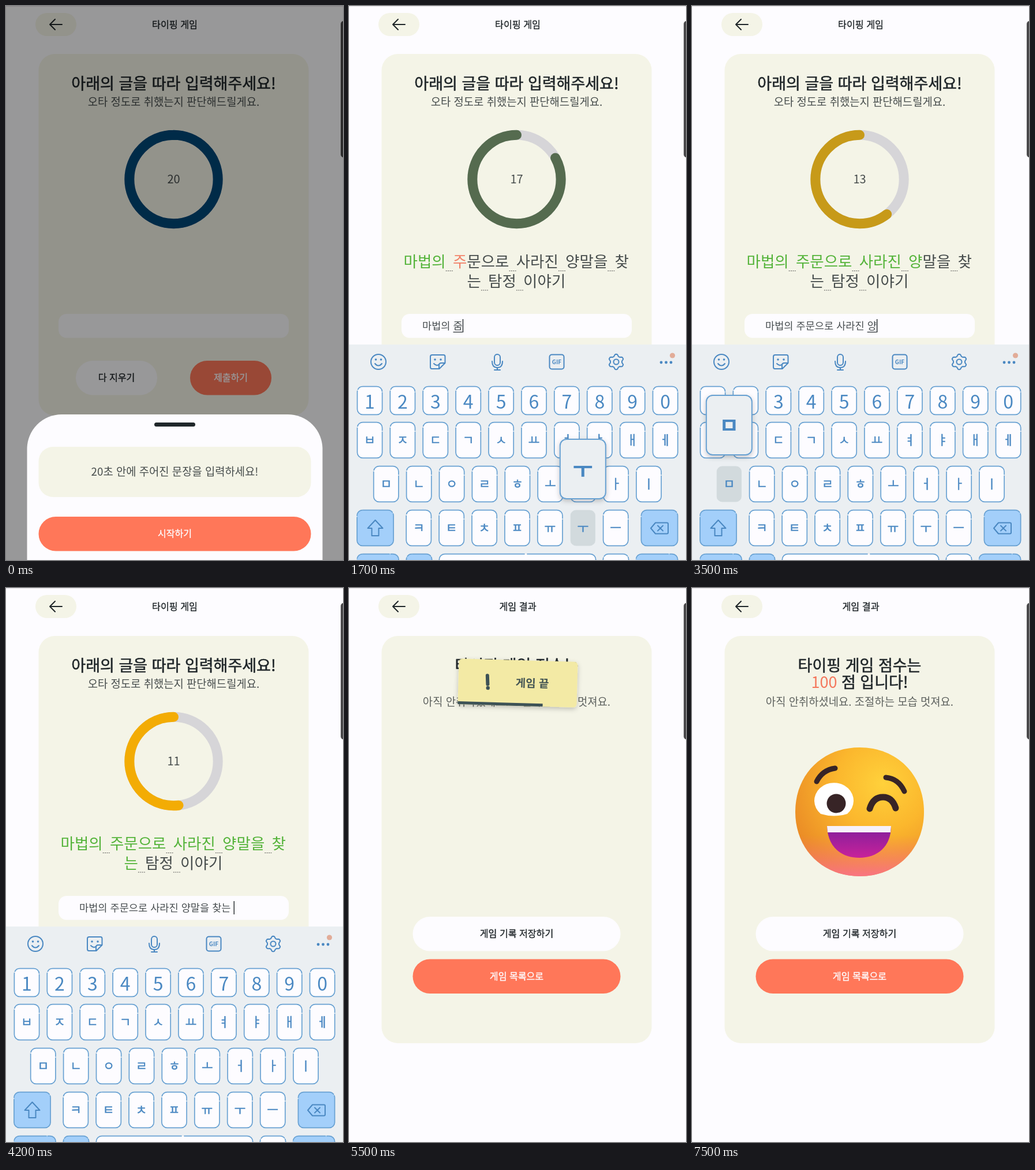
These frames come from a looping animation (584 px wide and 959 px high, 7.6 s). An HTML page:

```html
<!DOCTYPE html>
<html lang="ko">
<head>
<meta charset="utf-8">
<style>
  html, body { margin: 0; width: 100%; height: 100%; overflow: hidden; background: #fdfcff; }
  svg { display: block; width: 584px; height: 959px; }
  text { font-family: "Noto Sans CJK KR", "Noto Sans CJK", "Noto Sans CJK JP", sans-serif; white-space: pre; }
</style>
</head>
<body>
<svg id="stage" viewBox="0 0 584 959"></svg>
<script>
const LOOP = 7600, STEP = 100;
const INK = '#20272a', CREAM = '#f4f4e7', PAPER = '#fdfcff', CORAL = '#ff7759';
const BLUE = '#4a88c2', EDGE = '#68a1d2', SKY = '#a3cffa', BOARD = '#ebeff2', PRESSED = '#d2dadd';
const DARK = '#3d5256', BROWN = '#372426';
const MIDDLE = 'text-anchor="middle"';

// ---- markup helpers ----
// Only regular and bold faces exist: medium gets a hairline outline, light a softer fill.
const tone = (size, weight, fill) =>
  weight === 500 ? `stroke="${fill}" stroke-width="${size * 0.022}" stroke-linejoin="round"`
  : weight === 300 ? 'fill-opacity=".82"' : '';
const label = (s, x, y, size, weight = 400, fill = INK, extra = MIDDLE) =>
  `<text x="${x}" y="${y + size * 0.37}" font-size="${size}" font-weight="${weight === 700 ? 700 : 400}" fill="${fill}" ${tone(size, weight, fill)} ${extra}>${s}</text>`;
const box = (x, y, w, h, r, fill, extra = '') =>
  `<rect x="${x}" y="${y}" width="${w}" height="${h}" rx="${r}" fill="${fill}" ${extra}/>`;
const line = (d, width, stroke = BLUE, extra = '') =>
  `<path d="${d}" fill="none" stroke="${stroke}" stroke-width="${width}" stroke-linecap="round" stroke-linejoin="round" ${extra}/>`;
const button = (s, x, y, w, fill, color) =>
  box(x, y, w, 59.5, 29.75, fill) + label(s, x + w / 2, y + 29.5, 16.1, 500, color);

// ---- sentence to copy ----
const LINES = [['마법의 주문으로 사라진 양말을 찾', 94.5, 442, 458.5], ['는 탐정 이야기', 204.5, 476, 492]];
const GOAL = LINES.map(l => l[0]).join('');

function sentence() {
  return LINES.map(([chars, left, y, dotY]) => {
    let x = left;
    return [...chars].map(c => {
      const at = x;
      x += c === ' ' ? 12.2 : 24.4;
      return c === ' '
        ? `<path class="glyph" d="M${at} ${dotY}h12" stroke="#555" stroke-dasharray="2 1.4"/>`
        : label(c, at, y, 26.5, 300, INK, 'class="glyph"');
    }).join('');
  }).join('');
}

// ---- keyboard ----
const ROWS = [
  ['1234567890', 36, 658, 50],
  ['ㅂㅈㄷㄱㅅㅛㅕㅑㅐㅔ', 36, 720, 63],
  ['ㅁㄴㅇㄹㅎㅗㅓㅏㅣ', 64.3, 796, 63],
  ['ㅋㅌㅊㅍㅠㅜㅡ', 120.8, 872, 63]
];
const keySpots = {};
const keyBox = (x, y, w, h, fill, id = '') =>
  box(x + 0.4, y + 0.6, w - 0.8, h - 1.2, 9.5, fill, `stroke="${EDGE}" stroke-width="1.7" pathLength="100" stroke-dasharray="23 .6 69 .8 6.600 0" ${id}`);

function keys() {
  return ROWS.map(([chars, left, y, h], row) => [...chars].map((c, i) => {
    const x = left + i * 56.9;
    keySpots[c] = { x, y };
    return keyBox(x - 22, y, 44, h, PAPER, `data-key="${c}"`) +
      (row ? label(c, x, y + 31, 21.5, 500, BLUE) : label(c, x, y + 27.5, 32, 400, BLUE));
  }).join('')).join('');
}

function toolbar() {
  const cog = Array.from({ length: 48 }, (_, i) => {
    const a = i * Math.PI / 24, r = 11.6 + 1.6 * Math.tanh(3 * Math.cos(6 * a));
    return `${i ? 'L' : 'M'}${(463 + r * Math.sin(a)).toFixed(1)} ${(616 - r * Math.cos(a)).toFixed(1)}`;
  }).join('') + 'Z';
  return line('M64 616a13 13 0 1 0-26 0a13 13 0 1 0 26 0M45 619q6 7 12 0', 2) +
    line('M144 604h20q2.500 0 2.500 3v11l-10 10h-13q-2.500 0-2.500-3v-18q0-3 3-3M166 618h-6q-4 0-4 4v6M147 619q6 6 10 0', 2) +
    [46.5, 55.5, 149, 159].map(x => `<circle cx="${x}" cy="612" r="1.8" fill="${BLUE}"/>`).join('') +
    box(252, 603, 10, 19, 5, 'none', `stroke="${BLUE}" stroke-width="2"`) +
    line('M248 615q0 11 9 11t9-11M257 626v4M252 630h10', 2) +
    box(347.5, 603.5, 25, 25, 4, 'none', `stroke="${BLUE}" stroke-width="2"`) +
    label('GIF', 360, 616, 10, 700, BLUE) +
    line(cog, 2) + `<circle cx="463" cy="616" r="4.5" fill="none" stroke="${BLUE}" stroke-width="2"/>` +
    [541, 549.5, 558].map(x => `<circle cx="${x}" cy="617" r="2.4" fill="${BLUE}"/>`).join('') +
    '<circle cx="560.5" cy="605" r="4.6" fill="#e2ac98"/>';
}

const keyboard = () => `<g id="keyboard">${box(0, 586, 584, 400, 0, BOARD)}${toolbar()}${keys()}
  ${keyBox(13.5, 872, 64, 63, SKY)}${keyBox(506, 872, 64, 63, SKY, 'data-key="&lt;"')}
  ${line('M45.500 890l13 14h-7v13h-12v-13h-7z', 2)}
  ${line('M523 904l8-9.500h20q2 0 2 2v15q0 2-2 2h-20zM535 899.500l9 9M544 899.500l-9 9', 2)}
  ${keyBox(13.5, 948, 73, 40, SKY)}${keyBox(99, 948, 45, 40, SKY)}${keyBox(156, 948, 272, 40, PAPER, 'data-key=" "')}
  ${keyBox(440, 948, 45, 40, PAPER)}${keyBox(497, 948, 73, 40, SKY)}
  <g id="popup">${box(-39.5, -122, 79, 103, 11, BOARD, `stroke="${EDGE}" stroke-width="2" filter="url(#soft)"`)}
  ${label('', 0, -70, 38, 700, BLUE)}</g></g>`;

// ---- screens ----
const gamePage = () => `<g id="game">${box(56.5, 83, 468, 626, 28, CREAM)}
  ${label('아래의 글을 따라 입력해주세요!', 290.5, 134, 27, 500)}
  ${label('오타 정도로 취했는지 판단해드릴게요.', 290.5, 166, 18.8, 300)}
  <circle cx="290.5" cy="300" r="76.7" fill="none" stroke="#d6d5d8" stroke-width="17"/>
  ${line('M290.500 223.300a76.700 76.700 0 0 0 0 153.400a76.700 76.700 0 0 0 0-153.400', 17, '#004777', 'id="ring" pathLength="1"')}
  ${label('20', 290.5, 300, 20, 300, INK, 'id="count" ' + MIDDLE)}
  <g id="sentence">${sentence()}</g>
  ${box(91, 533, 399, 41.5, 14, PAPER)}
  ${label('', 127, 553, 17.6, 300, INK, 'id="typed"')}
  <path id="composing" stroke="${INK}" stroke-width="1.2"/><path id="cursor" stroke="${INK}" stroke-width="1.4"/>
  ${button('다 지우기', 121, 614, 141, PAPER, INK)}${button('제출하기', 319, 614, 141, CORAL, PAPER)}</g>`;

const FACE = 'M290.500 276C354 276 402 322 402 387.500C402 453 354 499 290.500 499C227 499 179 453 179 387.500C179 322 227 276 290.500 276Z';
const emoji = () => `<g id="emoji">
  <path d="${FACE}" fill="url(#skin)"/><path d="${FACE}" fill="url(#blush)"/>
  ${line('M216 335Q226 315 248 312', 9, BROWN)}${line('M336 328Q358 330 368 352', 9, BROWN)}
  <path d="M223 391A34 31 0 1 1 269 391Q246 398 223 391Z" fill="#fff"/>
  <circle cx="250" cy="373" r="16.5" fill="${BROWN}"/>
  ${line('M308 382Q314 362 331 362Q347 362 353 381', 11, BROWN)}
  <path d="M234 412H345C345 448 321 467 290 467C258 467 235 448 234 412Z" fill="url(#mouth)"/>
  <path d="M234 412H345L344 423H235Z" fill="#f6f1fa"/></g>`;

const resultPage = () => `<g id="result">${box(56.5, 83, 468, 705, 28, CREAM)}
  ${label('타이핑 게임 점수는', 290.5, 134, 27, 500)}
  ${label('<tspan stroke="none" fill="#f4775c">100</tspan> 점 입니다!', 290.5, 163, 27, 500)}
  ${label('아직 안취하셨네요. 조절하는 모습 멋져요.', 290.5, 197, 18.8, 300, '#3c4140')}
  ${emoji()}
  ${button('게임 기록 저장하기', 110.5, 569, 360, PAPER, INK)}${button('게임 목록으로', 110.5, 642.5, 360, CORAL, PAPER)}
  <g id="toast">${box(-103, -39, 206, 79, 6, '#f3eaa5', 'filter="url(#soft)"')}
  ${line('M-53-11L-52 4', 6, DARK)}<circle cx="-51.5" cy="10.5" r="3.2" fill="${DARK}"/>
  ${label('게임 끝', 25, 0, 19, 700, '#455654')}
  <rect id="progress" x="-103" y="35" height="5" fill="${DARK}"/></g></g>`;

const sheet = () => `<rect id="shade" width="584" height="959"/>
  <g id="sheet">${box(36.5, 707, 512, 320, 60, PAPER)}${box(257, 721, 71, 7, 3.5, INK)}
  ${box(56.5, 763, 472, 87, 25, CREAM)}${label('20초 안에 주어진 문장을 입력하세요!', 292.5, 806, 18.8, 300)}
  ${button('시작하기', 56.5, 884, 472, CORAL, PAPER)}</g>`;

const stage = document.getElementById('stage');
stage.innerHTML = `<defs>
  <filter id="soft" x="-20%" y="-20%" width="140%" height="150%"><feDropShadow dx="0" dy="3" stdDeviation="4" flood-opacity=".22"/></filter>
  <radialGradient id="skin" cx=".68" cy=".28" r=".8"><stop offset="0" stop-color="#ffd13b"/>
    <stop offset=".45" stop-color="#fbb72d"/><stop offset="1" stop-color="#e98825"/></radialGradient>
  <linearGradient id="blush" x1="0" y1="0" x2="0" y2="1"><stop offset=".68" stop-color="#f7756a" stop-opacity="0"/>
    <stop offset="1" stop-color="#fb6f94" stop-opacity=".85"/></linearGradient>
  <linearGradient id="mouth" x1="0" y1="0" x2="0" y2="1"><stop offset=".2" stop-color="#8f1f9c"/>
    <stop offset="1" stop-color="#c8229a"/></linearGradient></defs>
  ${box(0, 0, 584, 959, 0, PAPER)}${box(0, 0, 584, 1.2, 0, '#e3e1e6')}
  ${box(51, 12, 71, 40, 20, CREAM)}${line('M97 32H76M85 23L76 32L85 41', 2, INK)}
  ${label('', 292.5, 32, 16.2, 500, INK, 'id="title" ' + MIDDLE)}
  ${gamePage()}${resultPage()}${box(580, 26, 12, 236, 5, '#4a494b')}${keyboard()}${sheet()}`;

const el = {};
stage.querySelectorAll('[id]').forEach(n => el[n.id] = n);
const glyphs = [...stage.querySelectorAll('.glyph')];
const keyNodes = [...stage.querySelectorAll('[data-key]')];
const popupText = el.popup.querySelector('text');

// ---- typing: start time, interval, keys ("<" deletes) ----
const strokes = [
  [0.95, 0.061, 'ㅁㅏㅂㅓㅂㅇㅡㅣ ㅈㅜㅁㅜ'],
  [1.757, 0.075, 'ㄴㅇㅡㄹㅗ ㅅㅏㅎㅏㅈㅣ'],
  [2.65, 0.1, '<<<<'],
  [3.02, 0.049, 'ㄹㅏㅈㅣㄴ ㅇㅑㅇㅁㅏㄹㅇㅡㄹ ㅊㅏㅈㄴㅡㄴ '],
  [4.25, 0.045, 'ㅌㅏㅁㅈㅓㅇ ㅇㅣㅇㅑㄱㅣ']
].flatMap(([start, gap, chars]) => [...chars].map((key, i) => ({ key, at: start + i * gap })));
const LAG = 0.04, HOLD = 0.06;

const CHO = 'ㄱㄲㄴㄷㄸㄹㅁㅂㅃㅅㅆㅇㅈㅉㅊㅋㅌㅍㅎ';
const JUNG = 'ㅏㅐㅑㅒㅓㅔㅕㅖㅗㅘㅙㅚㅛㅜㅝㅞㅟㅠㅡㅢㅣ';
const JONG = ' ㄱㄲㄳㄴㄵㄶㄷㄹㄺㄻㄼㄽㄾㄿㅀㅁㅂㅄㅅㅆㅇㅈㅊㅋㅌㅍㅎ';

function erase(out, last) {
  if (last.tail) last.tail = '';
  else if (last.vowel) last.vowel = '';
  else out.pop();
}

// Joins the pressed keys into Hangul syllables.
function compose(pressed) {
  const out = [];
  for (const c of pressed) {
    const last = out[out.length - 1] || {};
    if (c === '<') erase(out, last);
    else if (JUNG.includes(c)) {
      if (last.tail) {
        out.push({ head: last.tail, vowel: c });
        last.tail = '';
      } else if (last.vowel === 'ㅡ' && c === 'ㅣ') last.vowel = 'ㅢ';
      else last.vowel = c;
    } else if (c !== ' ' && last.vowel && !last.tail) last.tail = c;
    else out.push({ head: c });
  }
  return out.map(({ head, vowel, tail }) => vowel
    ? String.fromCharCode(0xac00 + (CHO.indexOf(head) * 21 + JUNG.indexOf(vowel)) * 28 + JONG.indexOf(tail || ' '))
    : head);
}

const typedAt = t => compose(strokes.filter(s => s.at + LAG <= t).map(s => s.key));

// ---- animation ----
const ramp = (t, a, b) => Math.min(1, Math.max(0, (t - a) / (b - a)));
const ease = p => p * p * (3 - 2 * p);
const show = (node, on) => node.setAttribute('visibility', on ? 'inherit' : 'hidden');
const set = (node, attrs) => Object.entries(attrs).forEach(([k, v]) => node.setAttribute(k, v));
const mix = (a, b, p) => `rgb(${a.map((v, i) => Math.round(v + (b[i] - v) * p))})`;
const NAVY = [0, 71, 119], AMBER = [252, 176, 0], RED = [163, 0, 0];

function drawTimer(t) {
  const spent = Math.max(0, 2.5 * (t - 0.344));
  set(el.ring, {
    'stroke-dasharray': `${1 - spent / 20} 2`,
    stroke: spent < 10 ? mix(NAVY, AMBER, spent / 10) : mix(AMBER, RED, (spent - 10) / 5)
  });
  el.count.textContent = Math.ceil(20 - spent);
}

function drawTyping(t) {
  const chars = typedAt(t);
  glyphs.forEach((g, i) => {
    if (GOAL[i] !== ' ') g.setAttribute('fill', i >= chars.length ? INK : chars[i] === GOAL[i] ? '#2fa512' : '#f0664a');
  });
  const measure = s => {
    el.typed.textContent = s;
    return s ? 127 + el.typed.getComputedTextLength() : 127;
  };
  const from = measure(chars.slice(0, -1).join('')), end = measure(chars.join(''));
  const active = chars.length && chars[chars.length - 1] !== ' ';
  el.composing.setAttribute('d', active ? `M${from} 564.500H${end}` : '');
  el.cursor.setAttribute('d', `M${end + 0.8} 542V565`);
}

function drawKeyboard(t) {
  const up = ease(ramp(t, 0.5, 0.8)) * (1 - ease(ramp(t, 4.8, 5.05)));
  el.keyboard.setAttribute('transform', `translate(0 ${(1 - up) * 380})`);
  const hit = strokes.filter(s => t >= s.at && t < s.at + HOLD).pop();
  keyNodes.forEach(n => {
    const on = hit && n.dataset.key === hit.key;
    const base = n.dataset.key === '<' ? SKY : PAPER;
    set(n, { fill: on ? PRESSED : base, stroke: on ? 'none' : EDGE });
  });
  const spot = hit && keySpots[hit.key];
  show(el.popup, spot);
  if (spot) {
    popupText.textContent = hit.key;
    el.popup.setAttribute('transform', `translate(${Math.max(45, Math.min(539, spot.x))} ${spot.y})`);
  }
}

function drawResult(t) {
  show(el.emoji, t >= 5.7);
  const alpha = ramp(t, 5.2, 5.4) * (1 - ramp(t, 6.0, 6.2));
  set(el.toast, { opacity: alpha, transform: `translate(292.500 164) rotate(1.600) scale(${0.7 + 0.3 * alpha})` });
  el.progress.setAttribute('width', 206 * (1 - ramp(t, 5.3, 6.0)));
}

function render(ms) {
  const t = Math.floor(ms % LOOP / STEP) * STEP / 1000;
  const done = t >= 5.2, close = ease(ramp(t, 0.2, 0.5));
  el.title.textContent = done ? '게임 결과' : '타이핑 게임';
  show(el.game, !done);
  show(el.result, done);
  show(el.sentence, t >= 0.3);
  show(el.cursor, t >= 0.5);
  el.shade.setAttribute('opacity', 0.4 * (1 - close));
  el.sheet.setAttribute('transform', `translate(0 ${260 * close})`);
  if (done) drawResult(t);
  else {
    drawTimer(t);
    drawTyping(t);
  }
  drawKeyboard(t);
}

const began = performance.now();
function tick() {
  render(performance.now() - began);
  requestAnimationFrame(tick);
}
tick();
</script>
</body>
</html>
```
